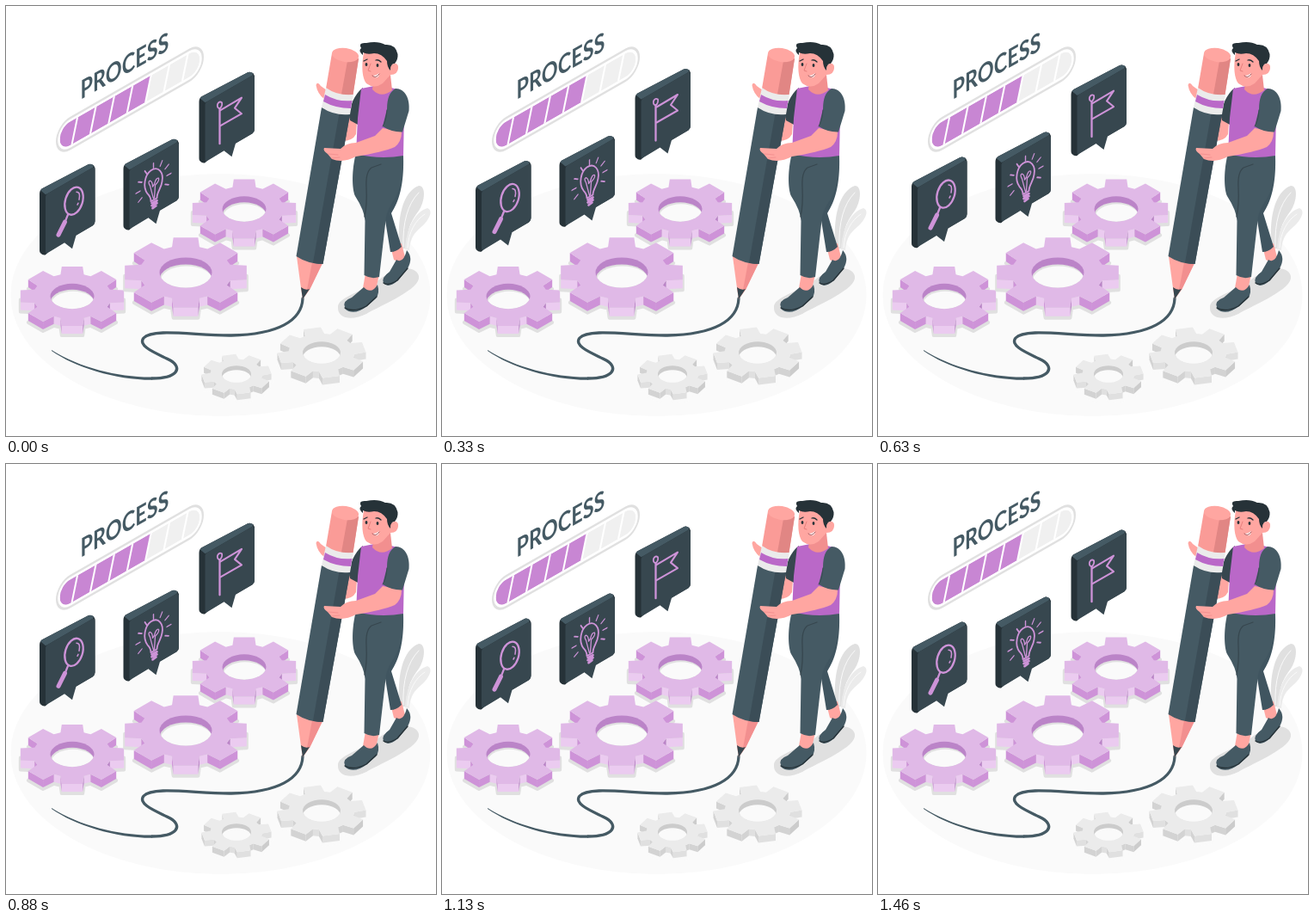
Animation, 500 px wide and 500 px high, one loop 1.5 s. Source, as an HTML page with a canvas:

```html
<!DOCTYPE html>
<html lang="en">
<head>
<meta charset="utf-8">
<title>Process</title>
<style>
html, body { margin: 0; width: 100%; height: 100%; overflow: hidden; background: #fff; }
canvas { display: block; width: 500px; height: 500px; }
</style>
</head>
<body>
<canvas id="stage" width="500" height="500"></canvas>
<script>
const ctx = document.getElementById('stage').getContext('2d');
const LOOP = 1500;
const PURPLE = '#ba68c8', LILAC = '#ce93d8', SKIN = '#ffa6a1', BLUSH = '#f28f8f';
const SLATE = '#455a64', DARK = '#37474f', INK = '#263238', FLOOR = '#fafafa';
const PINK_GEAR = { top: '#e0b9e7', front: '#ebcbf0', side: '#ce93d8', dark: '#bb84c8', shadow: '#e0e0e0' };
const GREY_GEAR = { top: '#ebebeb', front: '#e0e0e0', side: '#d3d3d3', dark: '#cccccc', shadow: FLOOR };

function fill(d, color) {
  ctx.fillStyle = color;
  ctx.fill(new Path2D(d));
}

function line(d, color, width) {
  ctx.strokeStyle = color;
  ctx.lineWidth = width;
  ctx.stroke(new Path2D(d));
}

function ellipse(x, y, rx, ry, color, angle = 0) {
  ctx.beginPath();
  ctx.ellipse(x, y, rx, ry, angle, 0, Math.PI * 2);
  ctx.fillStyle = color;
  ctx.fill();
}

function within(transform, draw) {
  ctx.save();
  ctx.transform(...transform);
  draw();
  ctx.restore();
}

function capsule(halfLength, r) {
  ctx.beginPath();
  ctx.roundRect(-halfLength, -r, halfLength * 2, r * 2, r);
}

function polygon(points, color, dy = 0) {
  ctx.beginPath();
  for (const [x, y] of points) ctx.lineTo(x, y + dy);
  ctx.closePath();
  ctx.fillStyle = color;
  ctx.fill();
}

function gear(cx, cy, r, hole, depth, turn, colors) {
  const points = [];
  const add = (angle, radius) =>
    points.push([cx + Math.sin(angle) * radius, cy - Math.cos(angle) * radius * 0.575]);
  for (let i = 0; i < 8; i++) {
    const a = turn + i * Math.PI / 4;
    add(a - 0.3, r * 0.74);
    add(a - 0.2, r * 0.99);
    add(a + 0.2, r * 0.99);
    add(a + 0.3, r * 0.74);
  }
  ctx.lineJoin = 'round';
  polygon(points, colors.shadow, depth + 2);
  ctx.strokeStyle = colors.shadow;
  ctx.lineWidth = 4;
  ctx.stroke();

  // Each visible wall is toned by the direction it faces.
  const walls = points.map((p, i) => [p, points[(i + 1) % points.length]])
    .filter(([p, q]) => q[0] < p[0])
    .sort(([a, b], [c, d]) => a[1] + b[1] - c[1] - d[1]);
  for (const [p, q] of walls) {
    const slope = (q[1] - p[1]) / (p[0] - q[0]);
    const color = slope > 0.9 ? colors.dark : Math.abs(slope) < 0.3 ? colors.front : colors.side;
    polygon([p, q, [q[0], q[1] + depth], [p[0], p[1] + depth]], color);
  }
  polygon(points, colors.top);

  ctx.save();
  ellipse(cx, cy, hole, hole * 0.575, colors.dark);
  ctx.clip();
  ellipse(cx, cy + depth - 2, hole, hole * 0.575, colors.shadow);
  ellipse(cx + 1, cy + depth, hole, hole * 0.575, FLOOR);
  ctx.restore();
}

function progressBar() {
  within([0.78, -0.44, 0, 1, 86.5, 109], () => {
    ctx.font = '700 30px Lato, sans-serif';
    ctx.fillStyle = SLATE;
    ctx.fillText('PROCESS', 0, 0);
  });
  within([0.866, -0.495, 0, 1, 144, 108.5], () => {
    capsule(98, 18);
    ctx.fillStyle = '#fff';
    ctx.fill();
    ctx.strokeStyle = '#e0e0e0';
    ctx.lineWidth = 2.6;
    ctx.stroke();
    capsule(94, 13.8);
    ctx.clip();
    ctx.fillStyle = '#f0f0f0';
    ctx.fill();
    fill('M-94 -14H28L21 14H-94Z', '#c886d3');
    for (let i = -3; i <= 3; i++) {
      line(`M${i * 24.7 - 4} 15L${i * 24.7 + 4} -15`, '#fff', 2.6);
    }
  });
}

function panel(dx, dy, icon) {
  within([1, 0, 0, 1, dx, dy], () => {
    fill('M39 218Q39 214 42 212L95.5 184Q98.5 182.5 102 185L103.5 188V250Q103.5 253 101 255L82 266L49 286L46 289Q43 290 40 287Q39 286 39 284Z', INK);
    fill('M40 214L42 212L95.5 184Q98.5 182.5 102 185L101 187.5L49 217.5L46 219Z', SLATE);
    fill('M46 222Q46 219 49 217.5L100 188Q103.5 186 103.5 190V250Q103.5 253 101 255L81.5 266.5L77 282L68 275L49 286.5Q46 289 46 285Z', DARK);
    ctx.lineCap = ctx.lineJoin = 'round';
    icon();
  });
}

// Icons share the first panel's coordinates.
function magnifier() {
  ctx.beginPath();
  ctx.ellipse(79, 226.5, 10, 16.5, 0.3, 0, Math.PI * 2);
  ctx.strokeStyle = LILAC;
  ctx.lineWidth = 2.3;
  ctx.stroke();
  line('M82 216Q87 216 85 225M84 229L83 231', LILAC, 1.5);
  line('M72 242.5L69 250', LILAC, 2.3);
  line('M68.5 251L61 266', LILAC, 5);
}

function bulb() {
  within([0.866, -0.5, 0, 1, 74, 235], () => {
    for (let i = 0; i < 9; i++) {
      const a = (i * 30 - 210) * Math.PI / 180;
      const x = Math.cos(a), y = Math.sin(a);
      line(`M${x * 18} ${y * 18}L${x * 23.5} ${y * 23.5}`, LILAC, 1.6);
    }
  });
  line('M71 256Q71 251 67 247C61 239 64 225 71 220C80 214 86 223 84 233C83 241 78 245 78 252Z', LILAC, 1.8);
  line('M74 253L70 238Q67 233 70 232Q73 233 73 239L75 236Q77 228 80 229Q81 232 76 237L75 252', LILAC, 1.3);
  line('M72 258L78 255M72 261L78 258M73 264L77 261', LILAC, 2.7);
}

function flag() {
  line('M63 226V267', LILAC, 2.3);
  line('M63 226Q59.5 225 60.5 221Q62.5 217 65.5 219Q66.5 223 63 226', LILAC, 1.8);
  line('M64 228L88.5 213.5L80.5 225.5L88.5 232L64 246', LILAC, 2.1);
}

function plant() {
  fill('M458 282C454 248 461 216 480 209C489 209 487 228 480 238C471 250 465 261 467 282Z', '#e0e0e0');
  fill('M464 283C466 255 477 239 490 235Q497 238 490 249C482 261 471 261 469 284Z', '#ebebeb');
  line('M462 280C461 252 467 230 480 217M467 281C468 263 476 249 487 242', FLOOR, 1);
}

function pencil() {
  fill('M338 291L343 328L345 341L353 330L368 299Z', SKIN);
  fill('M356 298L350 330L353 330L368 299Z', BLUSH);
  fill('M343 327Q348 331 353 329L345 341Z', DARK);
  fill('M367 118L337.5 291Q351 300 368.5 300L400 126Z', SLATE);
  fill('M388 122L357 298.5Q363 300 368.5 300L400 126Z', '#3b4d57');
  fill('M379 55L372 96Q386 106 403.5 103L410 61Z', '#fa9b97');
  fill('M397 64L390 102.5Q397 104 403.5 103L410 61Z', '#e18684');
  ellipse(394.5, 57, 15.7, 8, SKIN, 0.14);
  fill('M372 95Q386 105 404 103L400 126Q382 128 367 118Z', '#ebebeb');
  fill('M371 103Q386 112 402.5 110L401 119Q383 119 369 111Z', PURPLE);
}

function legs() {
  fill('M447 279L460 276L464 292Q459 300 451 295Z', SKIN);
  fill('M418 311L434 312L430 330Q421 335 415 328Z', SKIN);
  fill('M439 322Q436 316 446 309L454 295Q462 300 466 284Q474 293 467 305L456 319Q444 329 439 322Z', SLATE);
  fill('M394 350Q391 343 402 339L416 327Q425 336 432 324Q435 334 430 340L420 349Q404 361 394 352Z', SLATE);
  line('M439 322Q444 326 455 319L467 305M394 351Q404 357 419 349L431 338', INK, 1.4);
  fill('M427 175H462C463 208 457 227 448 241L460 280Q454 286 447 286L439 237Z', '#405560');
  fill('M407 171C402 190 402 212 406 221Q417 238 417.5 250L416.5 313Q425 318 434 315L442 245Q444 236 451 226Q462 210 462 171Z', SLATE);
  line('M417 245Q420 231 419 211Q418 193 425 188L436 184', DARK, 1.3);
}

function head() {
  fill('M428 84L447 80L449 98Q436 108 426 97Z', BLUSH);
  fill('M416 54C413 70 414 84 419 90Q428 97 438 90L447 80Q456 80 456 71Q454 65 447 69L445 51Z', SKIN);
  fill('M415 57Q409 52 413 49Q409 42 419 43Q432 40 441 45Q453 44 455.5 56Q456 62 452 67Q448 66 447 75Q443 71 443 64Q437 55 428 55Q420 57 415 54Z', INK);
  ellipse(451.5, 72, 4.2, 5.5, SKIN, 0.4);
  ellipse(419, 68, 1.4, 2, INK);
  ellipse(432, 69, 1.4, 2, INK);
  line('M416 64L420 62M430 63Q433 62 436 65', INK, 1.3);
  line('M424 67L421 75L424 76', '#e77f7d', 1);
  fill('M426 81Q431 81 434 78Q434 84 429 83Z', '#fff');
  line('M426 81Q430 85 434 79', '#9f4147', 0.9);
}

function man() {
  fill('M370 108Q362 102 360.5 92Q362 87 366 93L373 98L374 109Z', SKIN);
  fill('M397 126L408 134L407 149Q403 157 391 157Z', SKIN);
  fill('M415 95Q405 102 398 124L400 133L411 139Z', DARK);
  legs();
  pencil();
  fill('M413 96L428 93Q435 105 447 95L457 97L463 125L462 174Q435 179 407 172L409 130Z', PURPLE);
  head();
  fill('M438 142L460 146Q460 158 452 164Q438 170 407 175Q392 183 379 178L374 172Q368 168 370 165L389 166Q396 159 407 159L429 151Z', SKIN);
  line('M375 172L386 173M379 177L388 176', BLUSH, 0.9);
  fill('M453 96C464 96 470 108 468.5 122L461 146.5Q449 147 438 140L443 120Q443 101 453 96Z', SLATE);
  line('M443 121Q442 134 438 140', DARK, 0.8);
}

function trail() {
  ctx.lineCap = 'round';
  fill('M53 400C86 421 132 432 170 431.5V434.8C128 435 80 420 53 401Z', SLATE);
  line('M170 433C199 433 206 421 191 412C178 405 152 396 160 386C171 374 222 383.5 262 383C316 382 344 366 345 340', SLATE, 3.3);
}

function draw(time) {
  const phase = (time % LOOP) / LOOP * Math.PI * 2;
  const lift = 0.2 - 4.3 * (1 - Math.cos(phase + 0.04));
  ctx.fillStyle = '#fff';
  ctx.fillRect(0, 0, 500, 500);
  ellipse(249.5, 336, 244, 141, FLOOR);
  fill('M386 350C386 339 410 334 433 319C453 302 477 301 480 314C483 329 438 347 419 358C403 366 385 364 386 350Z', '#e0e0e0');
  plant();
  gear(277, 236, 62, 25.5, 9, 0, PINK_GEAR);
  gear(77, 337.5, 62, 25.5, 9, 0, PINK_GEAR);
  gear(209, 310, 73, 30.5, 10, 0, PINK_GEAR);
  gear(367, 403, 52, 22, 8, -0.22, GREY_GEAR);
  gear(268, 428, 41, 17, 7, -0.22, GREY_GEAR);
  trail();
  progressBar();
  panel(0, lift, magnifier);
  panel(97.5, lift - 29, bulb);
  panel(185.5, lift - 107, flag);
  man();
}

const start = performance.now();
function tick() {
  draw(performance.now() - start);
  requestAnimationFrame(tick);
}
draw(0);
requestAnimationFrame(tick);
</script>
</body>
</html>
```
